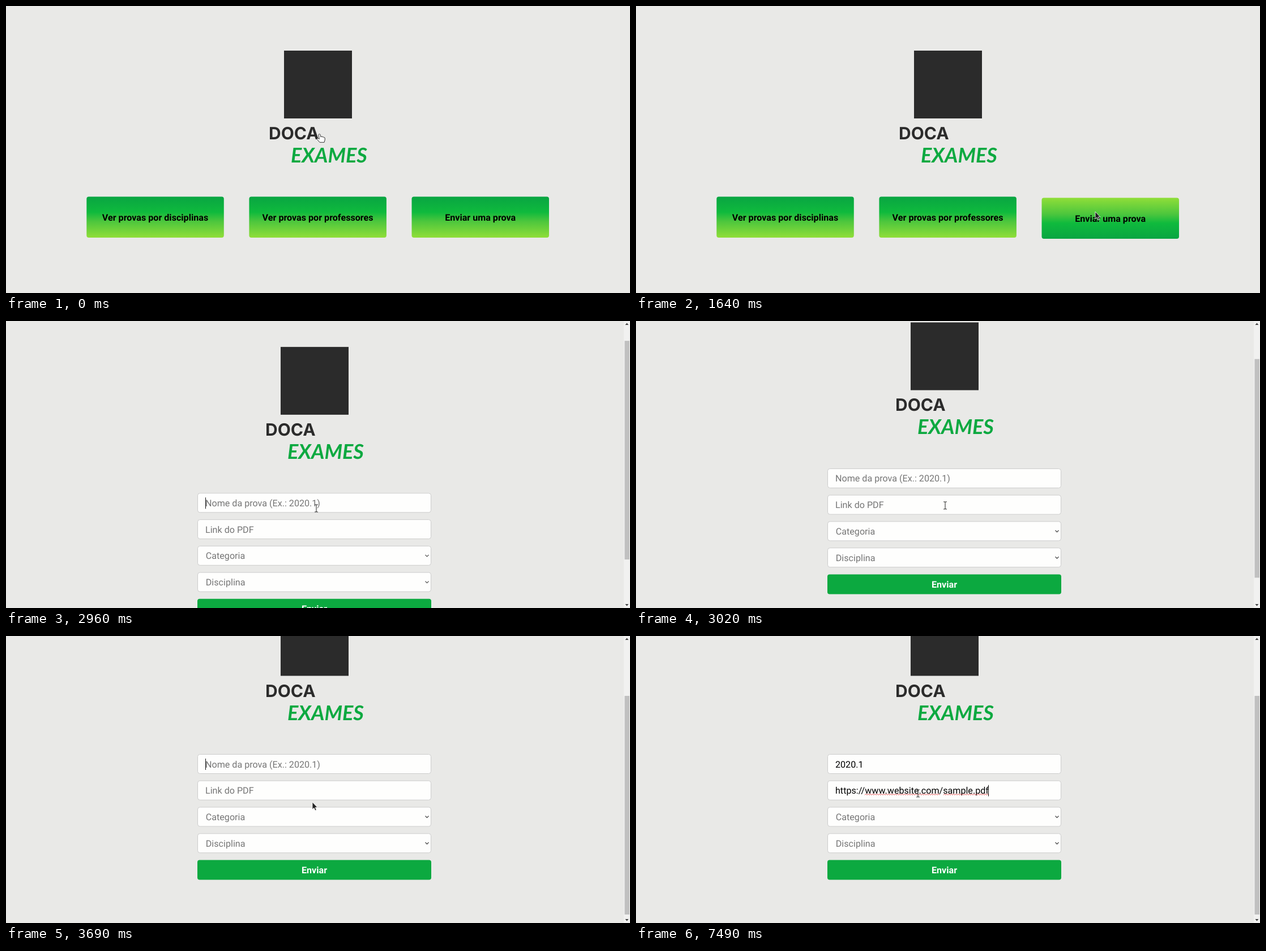
Write an HTML page that moves like this. It is 1102 by 508 pixels and loops after 8000 ms.

```html
<!DOCTYPE html>
<html lang="pt-BR">
<head>
<meta charset="utf-8">
<title>Envio de provas</title>
<style>
  html, body { margin: 0; width: 100%; height: 100%; overflow: hidden; background: #e9e9e7; }
  svg { display: block; width: 1102px; height: 508px; font: 16.13px Roboto, sans-serif; text-rendering: geometricPrecision; }
  .bold { font-weight: 700; text-anchor: middle; }
  .hint { fill: #757575; }
  .field { fill: #fefefd; stroke: #ccc; }
</style>
</head>
<body>
<svg id="stage" viewBox="0 0 1102 508">
  <defs>
    <linearGradient id="idle" x2="0" y2="1">
      <stop stop-color="#09a542"/>
      <stop offset=".38" stop-color="#0fba3d"/>
      <stop offset=".6" stop-color="#4cc63d"/>
      <stop offset="1" stop-color="#90de39"/>
    </linearGradient>
    <linearGradient id="hover" href="#idle" x1="0" y1="1" x2="0" y2="0"/>
    <g id="logo">
      <rect x="491" y="79" width="120" height="120" fill="#2b2b2b"/>
      <text x="464" y="236" font-family="Inter, sans-serif" font-size="30" font-weight="700" fill="#2b2b2b">DOCA</text>
      <text x="503" y="277" font-family="Lato, sans-serif" font-size="36" font-weight="700" font-style="italic" fill="#0ca940">EXAMES</text>
    </g>
  </defs>
  <rect width="1102" height="508" fill="#e9e9e7"/>
  <g id="home"><use href="#logo"/></g>
  <g id="form">
    <g id="page"><use href="#logo" x="-6"/></g>
    <rect x="1091" width="11" height="508" fill="#f1f1f0"/>
    <rect id="thumb" x="1092.5" width="8.5" height="387" fill="#c0c0c0"/>
    <path id="up" d="M1093.5 7l3-3.5 3 3.5z"/>
    <path d="M1093.5 501l3 3.5 3-3.5z" fill="#444"/>
  </g>
  <g id="pointer">
    <path id="arrow" d="M0 0V13L3 10.3L5 15L7.2 14L5.2 9.6H9Z" fill="#222" stroke="#fff" stroke-width=".8"/>
    <path id="beam" d="M-3 -7H-1L0 -6L1 -7H3M0 -6V5M-3 6H-1L0 5L1 6H3" fill="none" stroke="#333" stroke-width="1.1"/>
    <path id="hand" d="M-2 1.5Q-.5 -.5 1 1.5L2 6L3 5Q5 4.5 5 6Q7 5 7.3 6.7Q9 6 9.2 8V11L8 15.3H0L-5 9.5Q-5 7.5-3 8.2L-.7 9.5Z" fill="#fff" stroke="#333"/>
  </g>
</svg>
<script>
const LOOP = 8000, FORM_AT = 1710, ROW = 46.75;
const byId = id => document.getElementById(id);
const show = (el, on) => el.setAttribute('display', on ? 'inline' : 'none');

function add(parent, tag, attrs, text = '') {
  const el = document.createElementNS('http://www.w3.org/2000/svg', tag);
  for (const key in attrs) el.setAttribute(key, attrs[key]);
  el.textContent = text;
  return parent.appendChild(el);
}

const buttons = ['Ver provas por disciplinas', 'Ver provas por professores', 'Enviar uma prova'].map((label, i) => {
  const x = 142.3 + i * 287.1;
  const group = add(byId('home'), 'g', {});
  const box = add(group, 'rect', { x, y: 337.5, width: 242.5, height: 72.5, rx: 4 });
  add(group, 'text', { x: x + 121.2, y: 379.6, class: 'bold' }, label);
  return { x, group, box };
});

const page = byId('page');
const rowTop = i => 338 + i * ROW;
const fields = ['Nome da prova (Ex.: 2020.1)', 'Link do PDF', 'Categoria', 'Disciplina'].map((hint, i) => {
  const y = rowTop(i), isSelect = i > 1;
  add(page, 'rect', { x: 338.5, y, width: 412, height: 34, rx: 4, class: 'field' });
  if (isSelect) {
    add(page, 'path', { d: `M740.5 ${y + 15.5}l3 3 3-3`, fill: 'none', stroke: '#555', 'stroke-width': 1.4 });
  }
  return { hint, text: add(page, 'text', { x: isSelect ? 352.8 : 352, y: y + 23, class: 'hint' }, hint) };
});
add(page, 'rect', { x: 338, y: rowTop(4), width: 413, height: 35, rx: 4, fill: '#0ca940' });
add(page, 'text', { x: 544.5, y: rowTop(4) + 23.2, class: 'bold', fill: '#fff' }, 'Enviar');

const wave = (from, to) => {
  let d = `M${from} 410`;
  for (let x = from; x < to; x += 4) d += 'l2-2 2 2';
  return d;
};
const squiggle = add(page, 'path', { d: wave(404, 535) + wave(543, 622), fill: 'none', stroke: '#d33', 'stroke-width': 0.9 });
const caret = add(page, 'rect', { width: 1, height: 20, fill: '#111' });

// Keys are [time, ...values]; values hold before the first and after the last.
const pointerKeys = [
  [960, 554, 226], [1640, 811, 364], [1900, 811, 364], [1960, 764, 347],
  [2060, 764, 347], [2310, 562, 353], [2690, 562, 353], [2820, 551, 335],
  [2960, 548, 332], [3090, 543, 322], [3420, 541, 293.5],
  [6120, 541, 293.5], [6480, 497, 278], [6740, 497, 278], [6760, 498, 279]
];
const scrollKeys = [[2860, 0], [2910, 8], [2960, 32.4], [3020, 76], [3090, 114.8], [3140, 124], [3220, 128.5]];
const typing = [[4070, '2'], [4270, '20'], [4530, '202'], [4670, '2020'], [5490, '2020.'], [5560, '2020.1']];
const pasted = [[7490, 'https://www.website.com/sample.pdf']];
// Each span is [from, to, field index].
const caretSpans = [[2490, 2990, 0], [3690, 6560, 0], [6760, 7160, 1], [7490, LOOP, 1]];

function sample(keys, t) {
  const next = keys.findIndex(key => key[0] > t);
  if (next < 0) return keys[keys.length - 1].slice(1);
  if (next === 0) return keys[0].slice(1);
  const a = keys[next - 1], b = keys[next];
  const k = (t - a[0]) / (b[0] - a[0]);
  return a.slice(1).map((v, i) => v + (b[i + 1] - v) * k);
}

function setValue(field, steps, t) {
  const value = steps.filter(step => step[0] <= t).map(step => step[1]).pop() || '';
  field.text.textContent = value || field.hint;
  field.text.setAttribute('class', value ? '' : 'hint');
  return value;
}

function render(t) {
  const onForm = t >= FORM_AT;
  const [px, py] = sample(pointerKeys, t);
  const [scroll] = sample(scrollKeys, t);
  show(byId('home'), !onForm);
  show(byId('form'), onForm);

  for (const { x, group, box } of buttons) {
    const over = px >= x && px <= x + 242.5 && py >= 337.5 && py <= 410;
    group.setAttribute('transform', `translate(0 ${over ? 2 : 0})`);
    box.setAttribute('fill', over ? 'url(#hover)' : 'url(#idle)');
  }

  page.setAttribute('transform', `translate(0 ${-scroll})`);
  byId('thumb').setAttribute('y', 10.5 + scroll * 0.743);
  byId('up').setAttribute('fill', scroll > 0 ? '#444' : '#a3a3a3');
  const values = [setValue(fields[0], typing, t), setValue(fields[1], pasted, t)];
  show(squiggle, values[1]);

  const span = caretSpans.find(([from, to]) => t >= from && t < to);
  show(caret, span);
  if (span && onForm) {
    const row = span[2];
    const width = values[row] ? fields[row].text.getComputedTextLength() : 0;
    caret.setAttribute('x', Math.floor(352 + width));
    caret.setAttribute('y', rowTop(row) + 7.5);
  }

  const overText = onForm && px > 338 && px < 751 &&
    [0, 1].some(i => py + scroll >= rowTop(i) && py + scroll <= rowTop(i) + 34.5);
  const shape = t < 90 ? 'hand' : overText ? 'beam' : 'arrow';
  for (const id of ['hand', 'beam', 'arrow']) show(byId(id), id === shape);
  byId('pointer').setAttribute('transform', `translate(${Math.round(px)} ${Math.round(py)})`);
}

const start = performance.now();
function tick() {
  render((performance.now() - start) % LOOP);
  requestAnimationFrame(tick);
}
tick();
</script>
</body>
</html>
```
